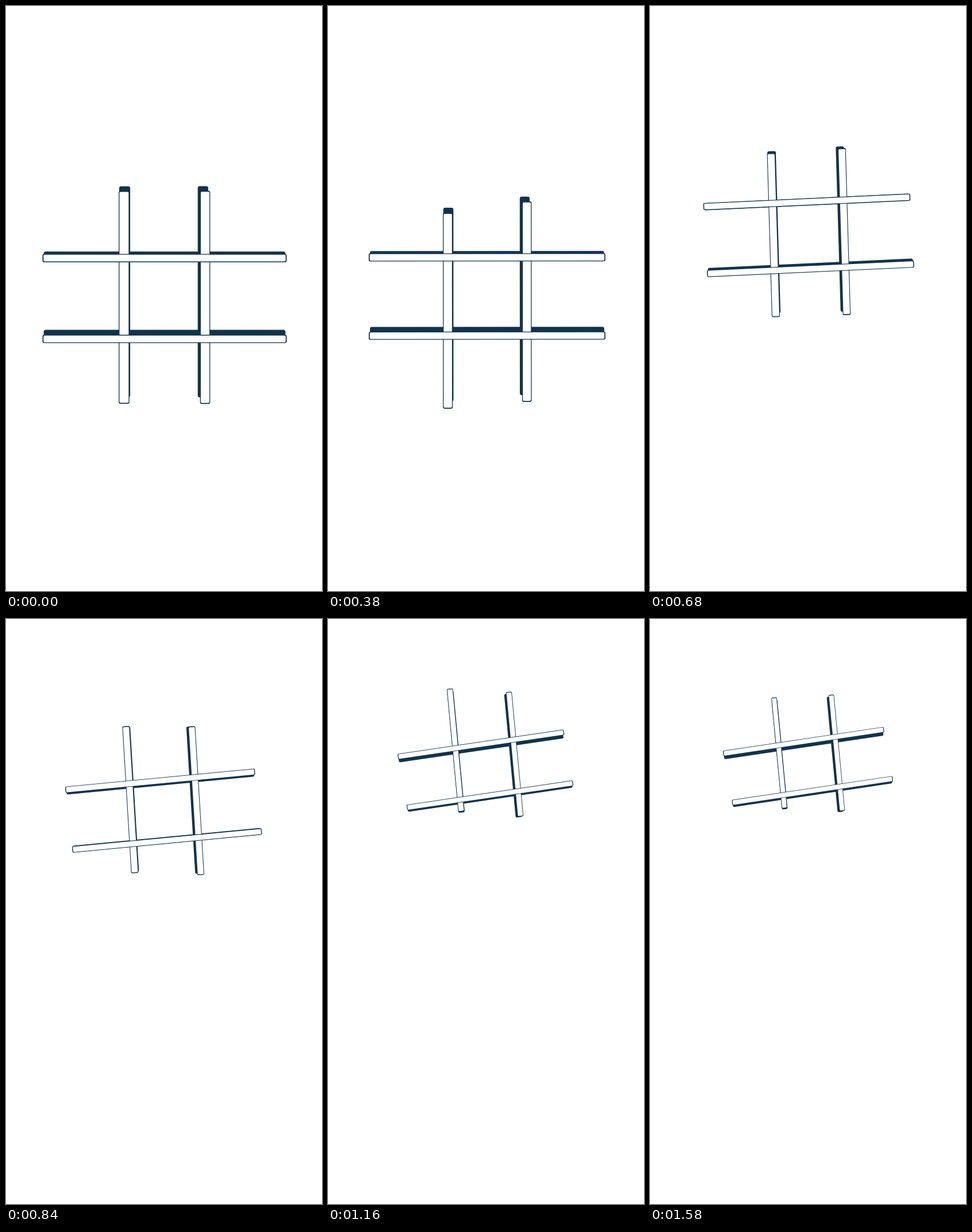
Recreate the animation shown at these times as an HTML page with a canvas. Size 550x1018 px, loop 1600 ms.

```html
<!DOCTYPE html>
<html lang="en">
<head>
<meta charset="utf-8">
<title>Lattice</title>
<style>
  html, body { margin: 0; width: 100%; height: 100%; overflow: hidden; background: #fff; }
  canvas { display: block; width: 100%; height: 100%; }
</style>
</head>
<body>
<canvas id="stage" width="550" height="1018"></canvas>
<script>
const ctx = document.getElementById('stage').getContext('2d');
const INK = '#12334b';
const LOOP = 1600, STEP = 20;

const clamp = u => Math.max(0, Math.min(1, u));
const bell = (t, center, width) => Math.exp(-(((t - center) / width) ** 2));

// S-curve from 0 to 1; a shapes the start, b the settling.
function ease(t, from, to, a, b) {
  return 1 - (1 - clamp((t - from) / (to - from)) ** a) ** b;
}

function slab(bar, dx, dy, len, width, radius, color) {
  ctx.save();
  ctx.translate(bar.x + dx, bar.y + dy);
  ctx.rotate(bar.angle);
  ctx.beginPath();
  ctx.roundRect(-len / 2, -width / 2, len, width, radius);
  ctx.fillStyle = color;
  ctx.fill();
  ctx.restore();
}

function drawBack(bar, s) {
  slab(bar, bar.dx, bar.dy, bar.len * 0.99, bar.width + 0.6 * s, 3.5 * s, INK);
}

function drawFront(bar, s) {
  slab(bar, 0, 0, bar.len, bar.width, 3 * s, INK);
  slab(bar, 0, 0, bar.len - 3.6 * s, bar.width - 2.6 * s, 2 * s, '#fff');
}

function draw(t) {
  const phase = t / LOOP;
  const shrink = ease(t, 200, 1600, 1.8, 3.83);
  const turn = ease(t, 300, 1600, 2.8, 11.5);
  const lift = ease(t, 340, 1440, 1.7, 3.9);

  const span = 425 - 142 * shrink;
  const s = span / 425;
  const tilt = 0.148 * turn;
  const sway = 3 * bell(t, 520, 130) - 3.3 * bell(t, 1000, 150);
  const cx = 276 - shrink, cy = 509 - 253 * lift;

  const gap = span * (0.1655 - 0.012 * turn);
  const rails = [-1, 1].map(side => ({
    x: cx + sway + side * gap * Math.sin(1.2 * tilt),
    y: cy + side * gap * Math.cos(1.2 * tilt),
    angle: -tilt,
    len: span,
    width: span * 0.034,
    dx: 0,
    dy: (358 - cy) * 0.04 - side * 2.25 * s ** 1.5
  }));

  // Posts ride a fading wave, the left one more strongly.
  const wave = Math.sin(2 * Math.PI * phase) * Math.cos(Math.PI * phase / 2);
  const post = (side, swing, len, ratio) => {
    const x = cx + 1.5 * sway + side * span * (0.166 + 0.0105 * shrink);
    const y = cy - 2 - 21 * shrink + swing * wave;
    return {
      x, y, len, width: len * ratio,
      angle: Math.PI / 2 - 0.64 * tilt,
      dx: (238 - x) * 0.034,
      dy: (290 - y) * 0.045
    };
  };
  const posts = [
    post(-1, 31, span * (0.872 - 0.19 * phase), 0.05),
    post(1, 14, span * (0.873 - 0.075 * shrink - 0.08 * phase), 0.0475)
  ];

  ctx.fillStyle = '#fff';
  ctx.fillRect(0, 0, 550, 1018);
  [...rails, ...posts].forEach(bar => drawBack(bar, s));
  [...posts, ...rails].forEach(bar => drawFront(bar, s));
}

function tick() {
  draw(Math.floor(performance.now() % LOOP / STEP) * STEP);
  requestAnimationFrame(tick);
}
tick();
</script>
</body>
</html>
```
